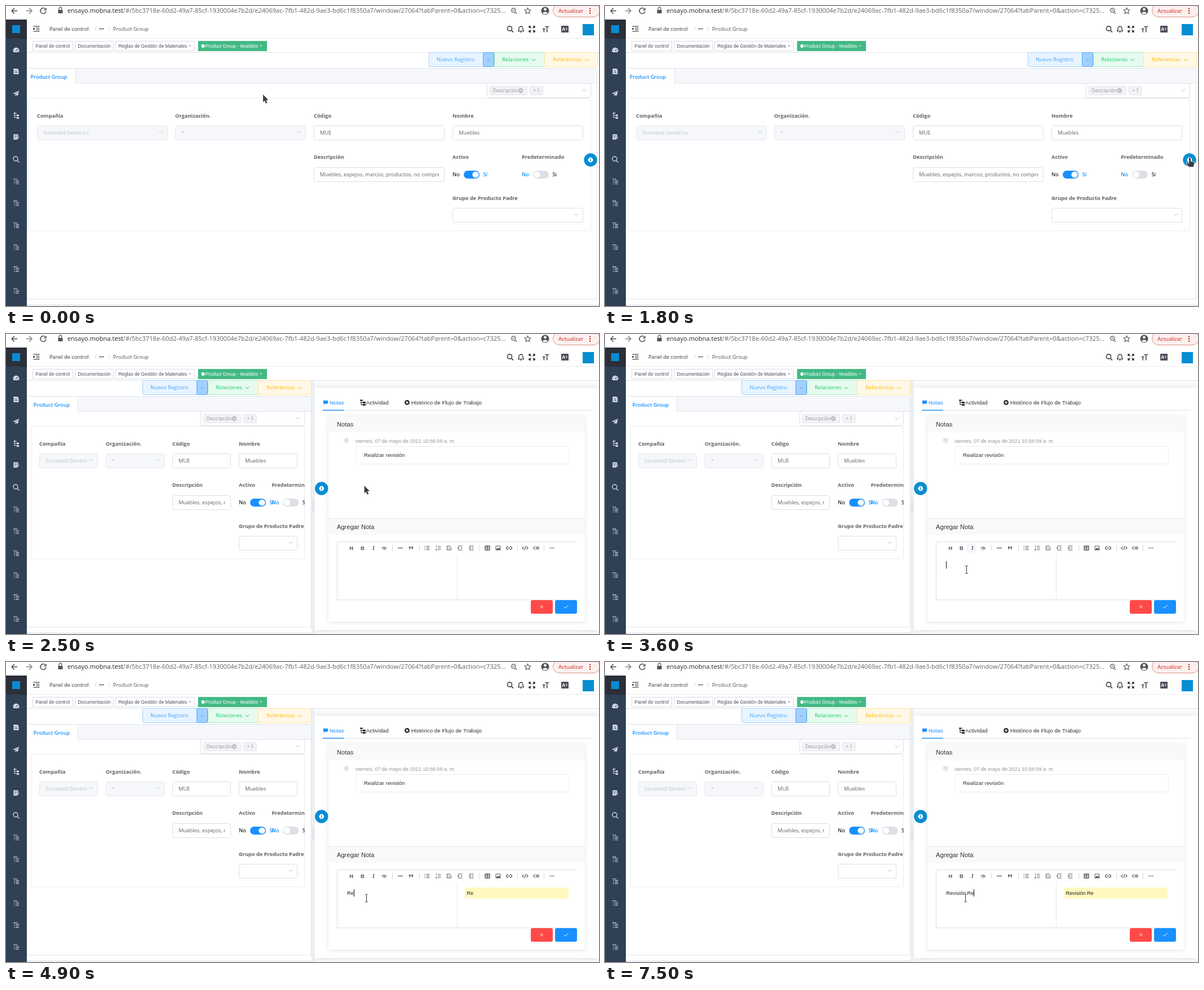
An HTML page with a canvas that plays this animation: 1052x532 px, repeating every 8 s.

```html
<!DOCTYPE html>
<html lang="es">
<head>
<meta charset="utf-8">
<title>Panel de control</title>
<style>
  html, body { margin: 0; width: 100%; height: 100%; overflow: hidden; background: #fff; }
  canvas { display: block; width: 1052px; height: 532px; }
</style>
</head>
<body>
<canvas id="stage" width="1052" height="532"></canvas>
<script>
const c = document.getElementById('stage').getContext('2d');
const UI = '"Open Sans", "Noto Sans", sans-serif';
const SANS = '"Liberation Sans", Arial, sans-serif';
const LOOP = 8000;
const BLUE = '#1890ff', INK = '#303133', GREY = '#606266', PALE = '#c0c4cc', LINE = '#dfe4ed', BRAND = '#068dd2';

// y is the middle of the capitals
function text(s, x, y, size, color, font = UI, weight = 400) {
  c.font = `${weight} ${size}px ${font}`;
  c.fillStyle = color;
  c.fillText(s, x, y + size * 0.36);
}
const label = (s, x, y, color = GREY) => text(s, x, y, 9.25, color, UI, 700);
const sans = (s, x, y, size, color = INK) => text(s, x, y - 0.4, size, color, SANS);

function rect(x, y, w, h, color) {
  c.fillStyle = color;
  c.fillRect(x, y, w, h);
}
function box(x, y, w, h, r, fill, stroke) {
  const inset = stroke ? 0.5 : 0;
  c.beginPath();
  c.roundRect(x + inset, y + inset, w - 2 * inset, h - 2 * inset, r);
  if (fill) { c.fillStyle = fill; c.fill(); }
  if (stroke) { c.strokeStyle = stroke; c.lineWidth = 1; c.stroke(); }
}
function disc(x, y, r, color) {
  c.beginPath();
  c.arc(x, y, r, 0, 7);
  c.fillStyle = color;
  c.fill();
}
function icon(d, x, y, fill, stroke, width = 1) {
  const p = new Path2D(d);
  c.save();
  c.translate(x, y);
  c.lineJoin = 'round';
  if (stroke) { c.strokeStyle = stroke; c.lineWidth = width; c.stroke(p); }
  if (fill) { c.fillStyle = fill; c.fill(p); }
  c.restore();
}
const line = (d, x, y, color, width) => icon(d, x, y, null, color, width);
const chevron = (x, y, color = PALE, k = 3.5) => line(`M${-k}-2L0 1.7 ${k}-2`, x, y, color, 1);
function clipped(x, y, w, h, draw) {
  c.save();
  c.beginPath();
  c.rect(x, y, w, h);
  c.clip();
  draw();
  c.restore();
}
function shadowed(blur, draw) {
  c.save();
  c.shadowColor = 'rgba(0,0,0,.12)';
  c.shadowBlur = blur;
  c.shadowOffsetY = 1;
  draw();
  c.restore();
}

const LENS = 'M3-1A4 4 0 1 1-5-1 4 4 0 1 1 3-1M2 2L5.5 5.5';
const TREE = 'M-4-4H1M-3-4V4M-3 0H4M-3 4H4';
const LIST = 'M-5-4H2M-.5-1.3H5M-.5 1.4H5M-.5 4.2H5M-3.5-1.3H-2M-3.5 1.4H-2M-3.5 4.2H-2';

function browserBar() {
  line('M5 0H-5M0-5L-5 0 0 5', 15, 8.5, '#44474b', 1.5);
  line('M5 0H-5M0-5L5 0 0 5', 41, 8.5, '#7d8084', 1.5);
  line('M3.6-3.6A5 5 0 1 0 5 1M5-5V-1.5H1.5', 66, 8.5, '#44474b', 1.5);
  rect(92.5, 7, 8, 6, '#505357');
  line('M-2.4 0V-2.5A2.4 2.4 0 0 1 2.4-2.5V0', 96.5, 7, '#505357', 1.2);
  const host = 'ensayo.mobna.test';
  text(host, 109, 8.5, 11.1, '#202124');
  const start = 109 + c.measureText(host).width;
  text('/#/5bc3718e-60d2-49a7-85cf-1930004e7b2d/e24069ac-7fb1-482d-9ae3-bd6c1f8350a7/window/27064?tabParent=0&action=c7325...', start, 8.5, 11.1, '#606469');
  line('M3-1A3.7 3.7 0 1 1-4.4-1 3.7 3.7 0 1 1 3-1M1.5 2L5 5.5M-2.5-1H1', 901, 8.5, '#505357', 1.2);
  line('M0-5.5L1.6-1.8 5.5-1.5 2.5 1.1 3.5 5 0 3-3.5 5-2.5 1.1-5.5-1.5-1.6-1.8Z', 925.5, 8.5, '#505357', 1.1);
  disc(956.5, 8.5, 7, '#505357');
  disc(956.5, 6, 2.4, '#fff');
  icon('M-4.5 4A5 3.4 0 0 1 4.5 4 6 6 0 0 1-4.5 4Z', 956.5, 8.5, '#fff');
  box(970, -4, 84, 24, 12, '#fcf0ef', '#df8d87');
  text('Actualizar', 980, 8.5, 9.6, '#c5221f');
  for (const y of [4.5, 8.5, 12.5]) disc(1036, y, 1.2, '#c5221f');
}

function sidebar() {
  const tint = '#d3dbe5';
  rect(0, 24, 37, 508, '#304156');
  rect(0, 24, 37, 34, '#2b2f3a');
  rect(11, 34, 14, 14, BRAND);
  icon('M-4.6 4A5.4 5.4 0 1 1 4.6 4Z', 18, 78, tint);
  line('M0 2L2-2M-3.3 1H-2M2 1H3.5', 18, 78, '#304156', 1);
  icon('M-4.5-5H2L4.5-2.5V5H-4.5Z', 18, 116, tint);
  line('M-2.5-1H2M-2.5 2H2.5', 18, 116, '#304156', 1);
  icon('M5-5L-5.5 0-2.5 1.5ZM5-5L-1.5 2V5.5L.3 3 3 4Z', 18, 155, tint);
  line(TREE, 18, 194, tint, 1.1);
  icon('M-4-5H-1V-3H-4ZM1-1.5H5V1.5H1ZM1 3H5V6H1Z', 18, 194, tint);
  icon('M-4.5-5H3.5V-1L0 4.5H-4.5Z', 18, 232.5, tint);
  line('M-2.5-2H1.5M-2.5 .5H0', 18, 232.5, '#304156', 1);
  line('M.8 4.2L5 0', 18, 232.5, tint, 1.6);
  line(LENS, 18, 272, tint, 1.4);
  for (let i = 0; i < 6; i++) line(LIST, 18, 311 + i * 38.85, tint, 1.1);
}

function header() {
  line('M-5.5-4.5H5.5M-1-1.5H5.5M-1 1.5H5.5M-5.5 4.5H5.5', 54, 40.5, '#222', 1.2);
  icon('M-5.5-2.5L-2.5 0-5.5 2.5Z', 54, 40.5, '#222');
  text('Panel de control', 77, 40.5, 9.2, INK);
  text('/', 157, 40.5, 9.2, PALE);
  for (const x of [166.5, 169.5, 172.5]) disc(x, 40.5, 1.1, INK);
  text('/', 181, 40.5, 9.2, PALE);
  text('Product Group', 190, 40.5, 9.2, '#515459');

  const dark = '#4c5158';
  line(LENS, 894.5, 41, dark, 1.8);
  line('M-5 3.5H5L3.6 1.5V-1A3.6 3.6 0 0 0-3.6-1V1.5ZM-1.2 5.3H1.2M0-4.6V-6', 913.5, 41, '#222', 1.2);
  line('M-5-2V-5H-2M2-5H5V-2M5 2V5H2M-2 5H-5V2M-5-5L-1.5-1.5M5-5L1.5-1.5M5 5L1.5 1.5M-5 5L-1.5 1.5', 933, 41, '#222', 1.3);
  line('M-1.5-4.5H6M2.3-4.5V5.5M-6-.5H-.5M-3.2-.5V5.5', 957.5, 41, dark, 1.7);
  box(985, 35, 13, 12, 1, dark);
  text('A', 986.5, 41.5, 8, '#fff', UI, 700);
  text('z', 993, 39.5, 6, '#fff', UI, 700);
  rect(1023, 32, 20, 20, BRAND);

  rect(37, 57, 1015, 1, '#eceef1');
  rect(37, 82, 1015, 1, '#dfe3ea');
  const tags = [['Panel de control', 47, 72], ['Documentación', 122, 69], ['Reglas de Gestión de Materiales', 194, 141]];
  for (const [s, x, w] of tags) {
    box(x, 62, w, 18, 0, '#fff', '#d8dce5');
    sans(s, x + 5.5, 71.4, 8.4, '#495060');
  }
  sans('×', 324, 71, 7.5, '#707682');
  rect(340.7, 62, 122.3, 18, '#42b983');
  disc(349.5, 71, 3, '#fff');
  sans('Product Group - Muebles', 353.5, 71.4, 8.4, '#fff');
  sans('×', 450, 71, 7.5, '#fff');
}

function actions(dx) {
  box(750 + dx, 82, 97, 26, 2, '#e8f4ff', '#a3d3ff');
  text('Nuevo Registro', 764 + dx, 95, 9.5, '#46a6ff');
  box(846 + dx, 82, 20, 26, 1, '#a3d0fd', '#4da9ff');
  chevron(856 + dx, 96, '#5aa9f0', 2.5);
  box(866 + dx, 82, 90, 26, 2, '#e7faf0', '#a1ebc2');
  text('Relaciones', 880 + dx, 95, 9.5, '#13ce66');
  chevron(936 + dx, 95.5, '#13ce66');
  box(955 + dx, 82, 95, 26, 2, '#fff8e6', '#ffe399');
  text('Referencias', 970 + dx, 95, 9.4, '#ffba00');
  chevron(1030 + dx, 95.5, '#ffba00');
}

function field(x, y, w, value, kind) {
  const off = kind === 'off', select = off || kind === 'select';
  box(x, y, w, 26, 3, off ? '#f5f7fa' : '#fff', off ? '#e4e7ed' : '#dcdfe6');
  clipped(x + 1, y, w - (select ? 21 : 11), 26, () => text(value, x + 11, y + 13, 9.4, off ? PALE : GREY));
  if (select) chevron(x + w - 12, y + 12);
}
function toggle(x, on, yes) {
  text('No', x, 299, 9.3, on ? INK : BLUE, UI, 600);
  box(x + 20, 292, 28, 14, 7, on ? BLUE : '#dcdfe6');
  disc(x + (on ? 41 : 27), 299, 5.6, '#fff');
  text(yes, x + 54.5, 299, 9.3, on ? BLUE : INK, UI, 600);
}

function form(split) {
  const right = split ? 542 : 1049, cardX = split ? 45 : 40, cardR = split ? 530 : 1038;
  const w = split ? 104 : 232, step = split ? 117.7 : 245.7;
  const col = [0, 1, 2, 3].map(i => Math.round((split ? 59.4 : 54.6) + i * step));
  const tabR = split ? 128 : 124;
  actions(split ? -508 : 0);

  rect(37, 111, right - 37, 27, '#f5f7fa');
  rect(37, 111, tabR - 37, 27, '#fff');
  rect(37, 110, right - 37, 1, LINE);
  rect(tabR, 137, right - tabR, 1, '#e4e7ed');
  rect(tabR - 1, 111, 1, 27, LINE);
  rect(right - 1, 111, 1, 409, LINE);
  rect(37, 519, right - 37, 1, LINE);
  rect(37, 529, 1015, 3, '#eceef2');
  text('Product Group', split ? 48.5 : 43.5, 125.5, 9.2, BLUE, UI, 600);

  box(cardX, 163, cardR - cardX, 236, 3, '#fff', '#e6ebf5');
  box(cardR - 185, 137, 185, 26, 3, '#fff', '#dcdfe6');
  rect(cardR - 184, 137, 183, 1, '#e4e7ed');
  box(cardR - 180, 142, 67, 16, 2, '#f2f3f5', '#e3e5e9');
  text('Descripción', cardR - 174.5, 150, 8.2, '#909399');
  disc(cardR - 125, 150, 4.2, '#b8bbc2');
  line('M-1.5-1.5L1.5 1.5M1.5-1.5L-1.5 1.5', cardR - 125, 150, '#fff', 0.9);
  box(cardR - 109, 142, 24, 16, 2, '#f2f3f5', '#e3e5e9');
  text('+ 1', cardR - 102.5, 150, 8.2, '#909399');
  chevron(cardR - 12, 149.5);

  clipped(cardX, 164, cardR - cardX, 234, () => {
    ['Compañía', 'Organización.', 'Código', 'Nombre'].forEach((s, i) => label(s, col[i], 195));
    field(col[0], 212, w, 'Sociedad Genérica', 'off');
    field(col[1], 212, w, '*', 'off');
    field(col[2], 212, w, 'MUE');
    field(col[3], 212, w, 'Muebles');
    const half = col[3] + (split ? 58.5 : 123);
    label('Descripción', col[2], 268);
    label('Activo', col[3], 268);
    label('Predeterminado', half, 268);
    field(col[2], 286, w, 'Muebles, espejos, marcos; productos, no comprendidos');
    toggle(col[3], true, 'Sí');
    toggle(half, false, 'Si');
    label('Grupo de Producto Padre', col[3], 341);
    field(col[3], 358, w, '', 'select');
  });
}

function infoButton(x, y) {
  disc(x, y, 11.7, BRAND);
  disc(x, y, 4.4, '#fff');
  rect(x - 0.7, y - 0.8, 1.5, 3.4, BRAND);
  rect(x - 0.7, y - 2.8, 1.5, 1.3, BRAND);
}

function toolbar() {
  const ink = '#4f5257', y = 379.5;
  const draw = (d, x, width = 1) => line(d, x, y, ink, width);
  for (const x of [685, 733, 840, 907, 954]) rect(x, 374, 1, 11, '#d5d8de');
  text('H', 609.3, y, 9.5, ink, SANS, 700);
  text('B', 629, y, 9.5, ink, SANS, 700);
  text('I', 650, y, 9.5, ink, '"Liberation Serif", serif', 'italic 700');
  text('S', 667.8, y, 9, ink, SANS);
  draw('M-4.5 0H4.5', 671, 1);
  draw('M-4.5 0H4.5', 699.5, 1.2);
  icon('M-3.5-2.5H-.8V0L-2 2.5H-3.2L-2.4 0H-3.5ZM.8-2.5H3.5V0L2.3 2.5H1.1L1.9 0H.8Z', 718.5, y, ink);
  draw('M-1.5-3H4.5M-1.5 0H4.5M-1.5 3H4.5M-4.5-3H-3M-4.5 0H-3M-4.5 3H-3', 747);
  draw('M-1-3H4.5M-1 0H4.5M-1 3H4.5M-3.5-4.5V-1.5M-4.5 1H-3L-4.5 4H-2.7', 767, 0.9);
  draw('M3.5 0V3.5H-3.5V-3.5H2M-1.7-.5L0 1.2 4-3', 786);
  draw('M-4-3.5H4M.5 0H4M-4 3.5H4', 806);
  icon('M-4.5-2L-1.5 0-4.5 2Z', 806, y, ink);
  draw('M-4-3.5H4M.5 0H4M-4 3.5H4', 825.5);
  icon('M-1.5-2L-4.5 0-1.5 2Z', 825.5, y, ink);
  draw('M-4-3.5H4V3.5H-4ZM-4-.3H4M0-3.5V3.5', 854, 1.3);
  draw('M-4-3.5H4V3.5H-4Z', 873);
  icon('M-3.5 3L-1-.5 .5 1 2-.7 3.7 3Z', 873, y, ink);
  draw('M-1-2.4H-2.5A2.4 2.4 0 0 0-2.5 2.4H-1M1-2.4H2.5A2.4 2.4 0 0 1 2.5 2.4H1M-2 0H2', 892.5, 1.2);
  draw('M-2.5-2.5L-5 0-2.5 2.5M2.5-2.5L5 0 2.5 2.5M1-3.5L-1 3.5', 921, 1.1);
  text('CB', 934.7, y, 8, ink, SANS, 700);
  for (const dx of [-3, 0, 3]) disc(968.5 + dx, y, 0.9, ink);
}

// [time, note so far, caret shown]
const TYPING = [
  [0, '', false], [3600, '', true], [3800, '', false], [4000, '', true], [4400, '', false],
  [4700, 'R', true], [4900, 'Re', true], [5100, 'Revi', true], [5400, 'Revis', true],
  [5600, 'Revisi', true], [6000, 'Revisi', false], [6400, 'Revisió', true],
  [6500, 'Revisión', true], [6700, 'Revisión ', true], [7500, 'Revisión Re', true]
];

function notes(t) {
  rect(548, 83, 504, 449, '#fafbfc');
  shadowed(8, () => rect(548, 94, 504, 431, '#fff'));
  rect(548, 94, 504, 1, '#eceef2');

  icon('M-4-3.5H4V2H0L-2.5 4V2H-4Z', 567, 121.5, BLUE);
  sans('Notas', 574, 121.5, 9.8, BLUE);
  line(TREE, 633, 121.5, '#222', 1.1);
  icon('M-5-5H-1V-3H-5ZM0-1.5H5V1.5H0ZM0 2.8H5V5.6H0Z', 633, 121.5, '#222');
  sans('Actividad', 639, 121.5, 9.8);
  disc(711.5, 121.5, 4.4, '#222');
  line('M-2.4 0H2.4M0-2.4V2.4', 711.5, 121.5, '#fff', 1.4);
  sans('Histórico de Flujo de Trabajo', 719, 121.5, 9.8);
  rect(562, 134.5, 476, 1.4, '#e4e7ed');
  rect(562, 134.5, 38, 1.4, BLUE);

  shadowed(7, () => rect(572, 146, 455, 364, '#fff'));
  rect(572, 146, 455, 28, '#f8f9fb');
  rect(572, 327, 455, 1, '#e2e5eb');
  rect(572, 328, 455, 28, '#f8f9fb');
  sans('Notas', 587, 160, 11.2);
  sans('Agregar Nota', 587, 342.3, 11.2);
  disc(604, 188.5, 4.5, '#dfe4ed');
  sans('viernes, 07 de mayo de 2021 10:56:09 a. m.', 620, 189.7, 9.05, '#909399');
  box(621, 199, 379, 32, 3, '#fff', '#e9ecf3');
  sans('Realizar revisión', 635, 215, 9.8);

  rect(587, 368, 426, 1, '#dcdfe3');
  rect(587, 368, 1, 103, '#dcdfe3');
  rect(587, 471, 426, 1, '#dcdfe3');
  rect(800, 390, 1, 81, '#e5e7eb');
  if (t >= 3600 && t < 3800) box(643, 372, 14, 15, 1, '#f7f9fc', '#e4e7ee');
  toolbar();
  box(931, 472, 39, 24, 2, '#ff4949', '#ff4949');
  line('M-2.5-2.5L2.5 2.5M2.5-2.5L-2.5 2.5', 950.5, 483.7, '#fff', 0.9);
  box(974, 472, 39, 24, 2, BLUE, BLUE);
  line('M-3.5 0L-1 2.5 4-2.7', 993.5, 483.7, '#fff', 1);

  const [, note, caret] = TYPING.filter(k => k[0] <= t).pop();
  if (note) {
    rect(814, 400, 184, 19.5, '#fff8c0');
    sans(note, 817.5, 410.3, 9.1, '#222');
  }
  sans(note, 605.2, 410.3, 9.1, '#222');
  if (caret) rect(Math.round(605 + c.measureText(note).width), 403, 1, 13, '#111');
}

function splitter() {
  rect(542, 83, 6, 447, '#eceff3');
  for (let y = 296; y < 316; y += 3) rect(543, y, 4, 1, '#cdd1d8');
}

const ARROW = 'M0 0V13.5L3 10.8 5.2 15.8 7.6 14.7 5.4 9.9 9.3 9.5Z';
const HAND = 'M-1.4 1A1.4 1.4 0 0 1 1.4 1V6L6.5 7.2Q8.3 7.8 7.8 10L6.3 15.8H-1.5L-6 9.8Q-6.2 8-4.4 8.3L-1.4 10.3Z';
const BEAM = 'M-2.5-6.5H-.8L0-5.8 .8-6.5H2.5M0-5.8V6.3M-2.5 7H-.8L0 6.3 .8 7H2.5';
const mix = (a, b, k) => a + (b - a) * k;
const ease = k => k * k * (3 - 2 * k);

function pointer(t) {
  const stepsFrom = start => Math.floor((t - start) / 100);
  if (t < 600) return [ARROW, 456, 157];
  if (t < 1500) {
    const k = ease((stepsFrom(600) + 1) / 9);
    return [k < 1 ? ARROW : HAND, mix(456, 1041, k), mix(157, 279, k) + 50 * Math.sin(Math.PI * k) * k];
  }
  if (t < 2200) {
    const k = Math.min(1, (stepsFrom(1500) + 1) / 4);
    return [HAND, mix(1041, 1037.5, k), mix(279, 269.5, k)];
  }
  if (t < 3600) {
    const k = ease(Math.min(1, stepsFrom(2200) / 3));
    return [ARROW, mix(1018, 635.7, k), mix(280, 269, k)];
  }
  return t < 3800 ? [BEAM, 641.5, 417.5] : [BEAM, 639.5, 418.5];
}

function cursor(t) {
  const [shape, x, y] = pointer(t);
  if (shape === BEAM) {
    line(BEAM, x, y, '#fff', 2.4);
    line(BEAM, x, y, '#333', 1);
  } else {
    icon(shape, x, y, '#3a3d41', '#fff', 1.6);
  }
}

function draw(t) {
  const split = t >= 2200;
  rect(0, 0, 1052, 532, '#fff');
  browserBar();
  sidebar();
  header();
  form(split);
  if (split) {
    if (t >= 2300) notes(t);
    splitter();
    infoButton(559.8, 274);
  } else {
    infoButton(1037, 273);
  }
  cursor(t);
}

function tick() {
  draw(performance.now() % LOOP);
  requestAnimationFrame(tick);
}
tick();
</script>
</body>
</html>
```
